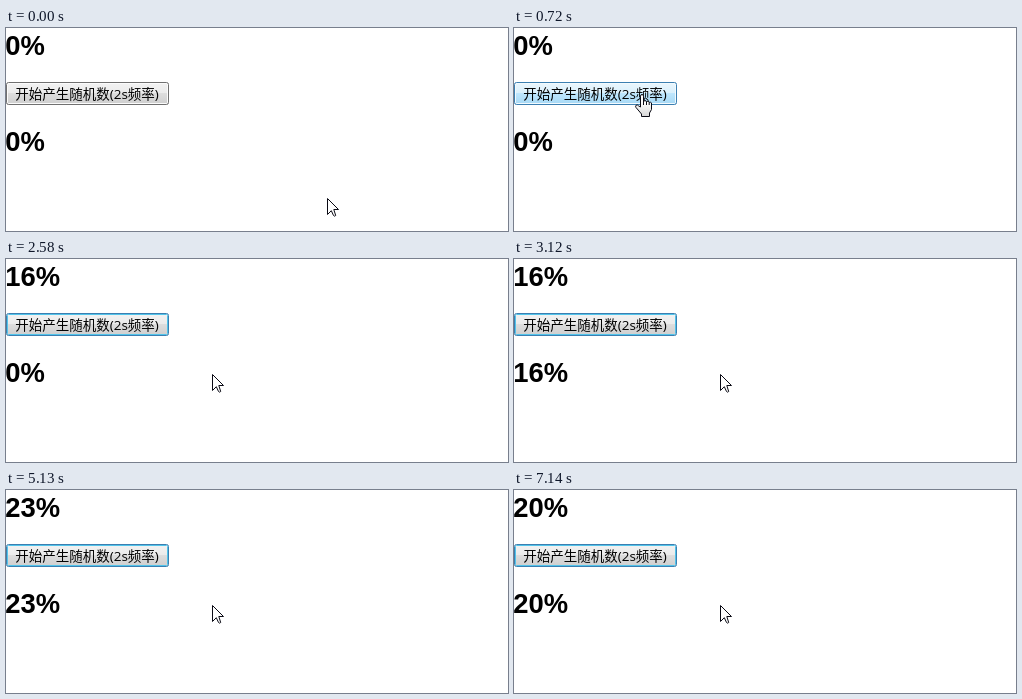
Write an HTML page with a canvas that moves like this. It is 502 px wide and 203 px high and loops after 8 s.

```html
<!DOCTYPE html>
<html lang="zh">
<head>
<meta charset="utf-8">
<style>
html, body { margin: 0; width: 502px; height: 203px; overflow: hidden; background: #fff; }
canvas { display: block; }
</style>
</head>
<body>
<canvas id="stage" width="502" height="203"></canvas>
<script>
const ctx = document.getElementById('stage').getContext('2d');
const LOOP = 8000;
const TWEEN = 520;

// Pointer stops: time, x, y, shape.
const pointer = [
  [0, 321, 170, 'arrow'], [70, 317, 167, 'arrow'], [140, 295, 152, 'arrow'],
  [210, 254, 127, 'arrow'], [280, 206, 100, 'arrow'], [350, 166, 80, 'arrow'],
  [420, 138, 69, 'hand'], [490, 126, 66, 'hand'], [730, 132, 70, 'hand'],
  [800, 166, 95, 'arrow'], [870, 200, 115, 'arrow'], [960, 204, 115, 'arrow'],
  [1110, 205, 115, 'arrow'], [1190, 206, 115, 'arrow']
];
const buttonStates = [[0, 'normal'], [420, 'hover'], [580, 'pressed'], [650, 'hover'], [800, 'focus']];
// Each new number, with the moments at which the lower counter repaints.
const draws = [
  { at: 2580, from: 0, to: 16, ticks: [2730, 2810, 2960, 3040, 3120] },
  { at: 4600, from: 16, to: 23, ticks: [4750, 4830, 4900, 5070, 5130] },
  { at: 6600, from: 23, to: 20, ticks: [6680, 6830, 6910, 6990, 7140] }
];
const skins = {
  normal: { border: '#707070', inner: '#fbfbfb', fill: ['#f2f2f2', '#ebebeb', '#dddddd', '#cfcfcf'] },
  hover: { border: '#3c7fb1', inner: '#f2fafe', fill: ['#eaf6fd', '#d9f0fc', '#bee6fd', '#a7d9f5'] },
  pressed: { border: '#2c628b', inner: '#9ebfd2', fill: ['#e5f4fc', '#c4e5f6', '#98d1ef', '#68b3db'] },
  focus: { border: '#3c7fb1', inner: '#52c4ea', fill: ['#f2f2f2', '#ebebeb', '#dddddd', '#cfcfcf'] }
};
const arrow = new Path2D('M.5 .5V16.5L4.3 12.7L6.5 17.5Q7.5 18.8 8.7 17.5L6.8 11.5H11.5Z');
const hand = new Path2D('M5.5 13V2.2Q5.5 .5 7 .5T8.5 2.2V8' +
  'Q8.7 6.5 10 6.5T11.5 8Q11.8 7 13 7.2T14.2 8.7Q14.6 8 15.7 8.3T16.5 10' +
  'V15.5L14.5 19V22.5H6.5V20L1 13.5Q0 12 1.2 11.2T3.5 11.8Z');
const creases = new Path2D('M8.5 8V11M11.5 8V11M14.2 8.7V11');

const latest = (list, t) => list.filter(item => item[0] <= t).pop();

function counters(t) {
  const draw = draws.filter(d => d.at <= t).pop();
  if (!draw) return [0, 0];
  const tick = draw.ticks.filter(k => k <= t).pop() ?? draw.at;
  const left = 1 - Math.min((tick - draw.at) / TWEEN, 1);
  const change = Math.trunc((draw.to - draw.from) * (1 - left * left));
  return [draw.to, draw.from + change];
}

function verticalGradient(top, bottom, stops) {
  const gradient = ctx.createLinearGradient(0, top, 0, bottom);
  stops.forEach(([offset, color]) => gradient.addColorStop(offset, color));
  return gradient;
}

function heading(value, baseline) {
  ctx.font = 'bold 27.4px "Liberation Sans", Arial, sans-serif';
  ctx.fillStyle = '#000';
  ctx.fillText(value + '%', -0.7, baseline);
}

function outline(inset, radius, color) {
  ctx.beginPath();
  ctx.roundRect(inset, 54 + inset, 163 - 2 * inset, 23 - 2 * inset, radius);
  ctx.strokeStyle = color;
  ctx.lineWidth = 1;
  ctx.stroke();
}

function button(state) {
  const skin = skins[state];
  ctx.fillStyle = verticalGradient(55, 76, [0, 0.5, 0.5, 1].map((stop, i) => [stop, skin.fill[i]]));
  ctx.beginPath();
  ctx.roundRect(0.5, 54.5, 162, 22, 2);
  ctx.fill();
  outline(1.5, 1, skin.inner);
  outline(0.5, 2, skin.border);
  ctx.fillStyle = '#000';
  ctx.font = '13.5px "Open Sans", "Noto Sans CJK SC", "Noto Sans CJK", sans-serif';
  ctx.fillText('开始产生随机数(2s频率)', 9.2, 71);
}

function cursor([, x, y, shape]) {
  const isHand = shape === 'hand';
  ctx.save();
  ctx.translate(isHand ? x - 5 : x, y);
  ctx.fillStyle = isHand ? verticalGradient(8, 23, [[0, '#fff'], [1, '#d4d4d4']]) : '#fff';
  ctx.strokeStyle = '#0a0a14';
  ctx.lineWidth = 1;
  ctx.lineJoin = 'round';
  ctx.fill(isHand ? hand : arrow);
  ctx.stroke(isHand ? hand : arrow);
  if (isHand) ctx.stroke(creases);
  ctx.restore();
}

function frame(now) {
  const t = now % LOOP;
  const [target, shown] = counters(t);
  ctx.fillStyle = '#fff';
  ctx.fillRect(0, 0, 502, 203);
  heading(target, 27);
  button(latest(buttonStates, t)[1]);
  heading(shown, 123);
  cursor(latest(pointer, t));
  requestAnimationFrame(frame);
}

frame(0);
</script>
</body>
</html>
```
